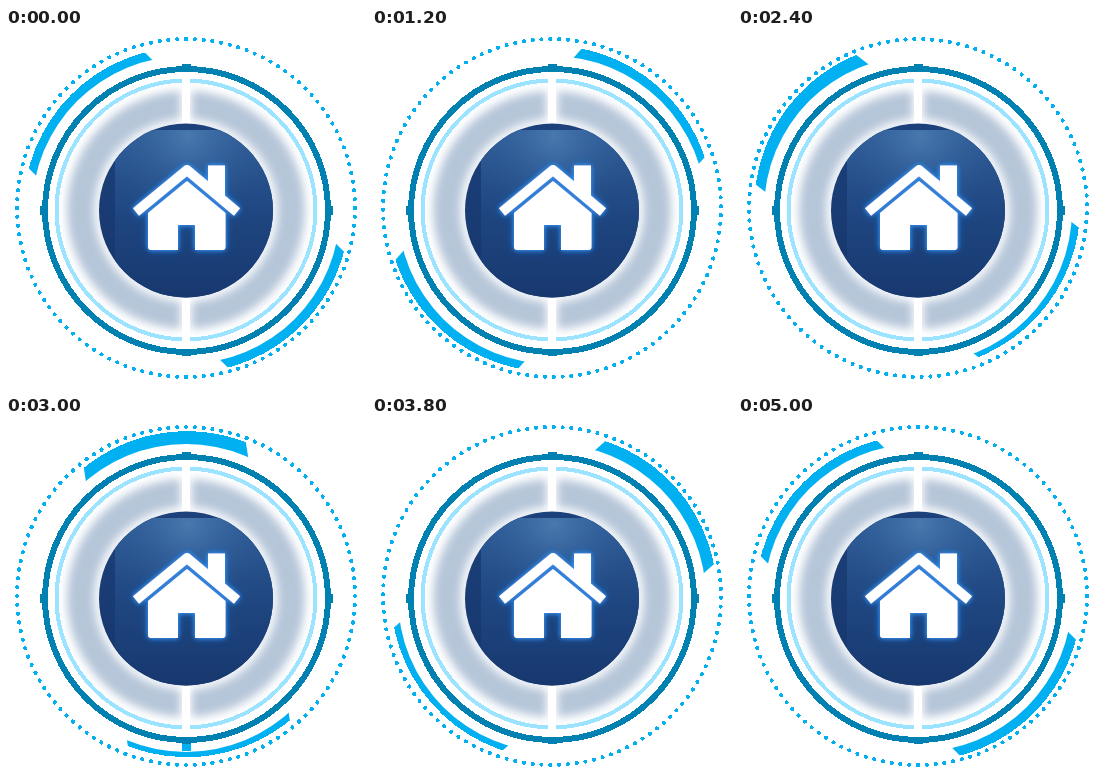
These frames come from a looping animation (360x360 px, 5100 ms). An HTML page:

```html
<!DOCTYPE html>
<html lang="en">
<head>
<meta charset="utf-8">
<style>
  html, body { margin: 0; width: 100%; height: 100%; overflow: hidden; background: #fff; }
  svg { display: block; width: 360px; height: 360px; }
  .crisp { shape-rendering: crispEdges; }
</style>
</head>
<body>
<svg viewBox="0 0 360 360">
  <defs>
    <clipPath id="band"><rect x="10" y="100" width="340" height="164" transform="rotate(45 180.4 182)"/></clipPath>
    <clipPath id="disc"><circle cx="180" cy="182.5" r="87"/></clipPath>
    <clipPath id="dial"><circle cx="180" cy="182" r="127.5"/></clipPath>
    <linearGradient id="navy" x2="0" y2="1">
      <stop offset="0" stop-color="#1d417b"/>
      <stop offset="1" stop-color="#16366c"/>
    </linearGradient>
    <linearGradient id="panel" x2="0" y2="1">
      <stop offset="0" stop-color="#305e99"/>
      <stop offset=".5" stop-color="#1f4680"/>
      <stop offset="1" stop-color="#17386f"/>
    </linearGradient>
    <radialGradient id="shine" gradientUnits="userSpaceOnUse" cx="182" cy="108" r="85">
      <stop offset="0" stop-color="#4f7fb4" stop-opacity=".8"/>
      <stop offset="1" stop-color="#2b5792" stop-opacity="0"/>
    </radialGradient>
    <filter id="soft" filterUnits="userSpaceOnUse" x="30" y="30" width="300" height="300">
      <feGaussianBlur stdDeviation="4"/>
    </filter>
    <filter id="glow" x="-.2" y="-.2" width="1.4" height="1.4">
      <feDropShadow dx="0" dy="0" stdDeviation="2" flood-color="#3f9fff"/>
      <feDropShadow dx="0" dy="0" stdDeviation="3.5" flood-color="#1f78e0" flood-opacity=".7"/>
    </filter>
  </defs>

  <g id="spinner" class="crisp" fill="#00b0f0">
    <circle cx="180" cy="180" r="169" fill="none" stroke="#00b0f0" stroke-width="4.2"
            stroke-linecap="round" pathLength="120" stroke-dasharray="0 1"/>
    <circle cx="180.4" cy="182" r="163" clip-path="url(#band)"/>
  </g>

  <!-- White cover, notched on three sides so the spinner shows through -->
  <path fill="#fff" fill-rule="evenodd" d="M26 182a154 154 0 0 1 308 0a154 154 0 0 1-308 0Z
    M32 178h5v9h-5Z M323 178h10v9h-10Z M176 325h9v10h-9Z"/>

  <g class="crisp" fill="none" stroke="#0081b2">
    <circle cx="180.5" cy="182.5" r="141.5" stroke-width="6"/>
    <path stroke-width="9" d="M180.5 36v6M180.5 322v6M34 182.5h6M321 182.5h6"/>
  </g>

  <g clip-path="url(#dial)">
    <circle cx="180" cy="182" r="127" fill="#b6c6d9"/>
    <g filter="url(#soft)" fill="none" stroke="#fff">
      <circle cx="180" cy="182" r="127" stroke-width="16"/>
      <circle cx="180" cy="182.5" r="87" stroke-width="9"/>
      <path stroke-width="11" d="M180 50V314"/>
    </g>
  </g>
  <circle class="crisp" cx="180" cy="182" r="129.5" fill="none" stroke="#9be3ff" stroke-width="4"/>
  <path fill="#fff" d="M176 48h8v268h-8Z"/>

  <g clip-path="url(#disc)">
    <path fill="url(#navy)" d="M93 95h174v175H93Z"/>
    <path fill="url(#panel)" d="M109 102h158v168H109Z"/>
    <path fill="url(#shine)" d="M109 102h158v168H109Z"/>
  </g>

  <g filter="url(#glow)" fill="#fff">
    <path d="M202 137.5h17v35l-17-13Z"/>
    <path d="M142 185L181 153L219.5 185V219q0 3-3 3H189V197H172V222H145q-3 0-3-3Z"/>
    <path fill="none" stroke="#fff" stroke-width="9.5" stroke-linejoin="round" d="M130 184L181 142L231 184"/>
  </g>
</svg>
<script>
  const STEP = 100, STEPS = 50;
  const spinner = document.getElementById('spinner');

  function draw(now) {
    const step = Math.floor(now / STEP) % (STEPS + 1);   // the last step repeats the first pose
    spinner.setAttribute('transform', `rotate(${step * 360 / STEPS} 180 180)`);
    requestAnimationFrame(draw);
  }
  draw(performance.now());
</script>
</body>
</html>
```
